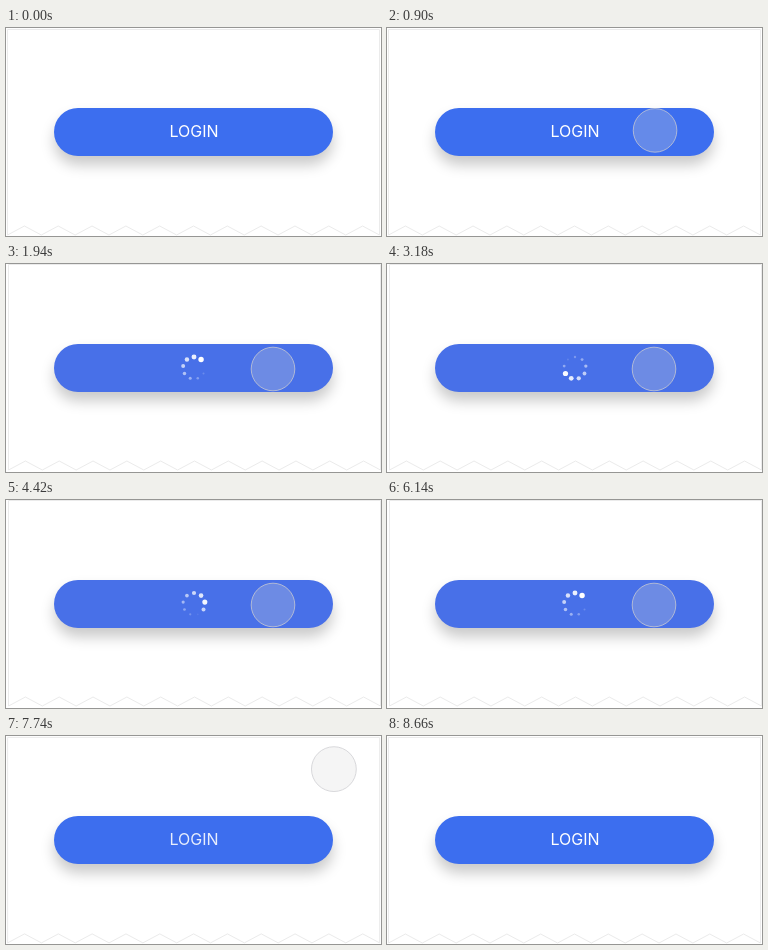
Write an HTML page that moves like this. It is 375 by 208 pixels and loops after 9080 ms.

```html
<!DOCTYPE html>
<html lang="en">
<head>
<meta charset="utf-8">
<title>Login button</title>
<style>
  html, body { margin: 0; width: 100%; height: 100%; overflow: hidden; background: #fff; }
  #button {
    position: absolute; left: 48px; top: 80px; width: 279px; height: 48px;
    border-radius: 24px; box-shadow: 0 9px 14px rgba(0, 0, 0, .21);
  }
  svg { position: absolute; left: 0; top: 0; }
  text { font: 400 16px Inter, sans-serif; fill: #fff; text-anchor: middle; }
  #card { fill: none; stroke: #ebebeb; }
  #spinner { fill: #fff; }
  #cursor { fill: rgba(214, 214, 214, .26); stroke: rgba(205, 205, 208, .75); }
</style>
</head>
<body>
<div id="button"></div>
<svg width="375" height="208">
  <path id="card"/>
  <text id="label" x="188" y="109.3">LOGIN</text>
  <g id="spinner"></g>
  <circle id="cursor"/>
</svg>
<script>
const LOOP = 9080, DOTS = 9, TURN = 2100;
const $ = id => document.getElementById(id);
const set = (el, attrs) => { for (const k in attrs) el.setAttribute(k, attrs[k]); };
const mix = (a, b, p) => a + (b - a) * p;
const ramp = (t, from, to) => Math.min(1, Math.max(0, (t - from) / (to - from)));
const inOut = p => p < .5 ? 4 * p ** 3 : 1 - 4 * (1 - p) ** 3;
const easeIn = p => p * p;

// Torn-paper card outline
let outline = 'M1.5 207V1.5H373.5V207';
for (let i = 21; i >= 0; i--) outline += `L${1.5 + i * 372 / 22} ${i % 2 ? 198 : 207}`;
$('card').setAttribute('d', outline);

const dots = Array.from({ length: DOTS }, (_, i) => {
  const dot = document.createElementNS('http://www.w3.org/2000/svg', 'circle');
  const angle = i / DOTS * 2 * Math.PI;
  set(dot, { cx: 188 + 11 * Math.sin(angle), cy: 104 - 11 * Math.cos(angle) });
  return $('spinner').appendChild(dot);
});

// Pointer moves: start, end, destination, easing
const START = [319, -25];
const MOVES = [
  [520, 980, [267, 105], inOut],
  [6900, 7810, [328, 33], inOut],
  [8430, 8650, [343, -26], easeIn],
];

function pointer(t) {
  let pos = START;
  for (const [from, to, dest, ease] of MOVES) {
    const p = ease(ramp(t, from, to));
    pos = pos.map((v, i) => mix(v, dest[i], p));
  }
  return pos;
}

function draw(now) {
  const t = now % LOOP;

  const busy = ramp(t, 1520, 1760) - ramp(t, 7320, 7800);
  const rgb = [[60, 72], [110, 112], [239, 232]].map(([a, b]) => mix(a, b, busy));
  $('button').style.background = `rgb(${rgb})`;
  $('label').setAttribute('opacity', 1 - busy);
  $('card').setAttribute('transform', `translate(${busy} ${-busy})`);

  $('spinner').setAttribute('opacity', ramp(t, 1660, 1900) - ramp(t, 7060, 7320));
  const head = 1 + (t - 1940) / TURN * DOTS;
  dots.forEach((dot, i) => {
    const lag = ((head - i) % DOTS + DOTS) % DOTS;
    const level = lag > 8 ? lag - 8 : 1 - lag / 8;
    set(dot, { r: .8 + 1.9 * level, opacity: level ** .8 });
  });

  const [cx, cy] = pointer(t);
  set($('cursor'), { cx, cy, r: mix(21.8, 22.4, ramp(t, 7100, 7340)) });

  requestAnimationFrame(draw);
}
requestAnimationFrame(draw);
</script>
</body>
</html>
```
